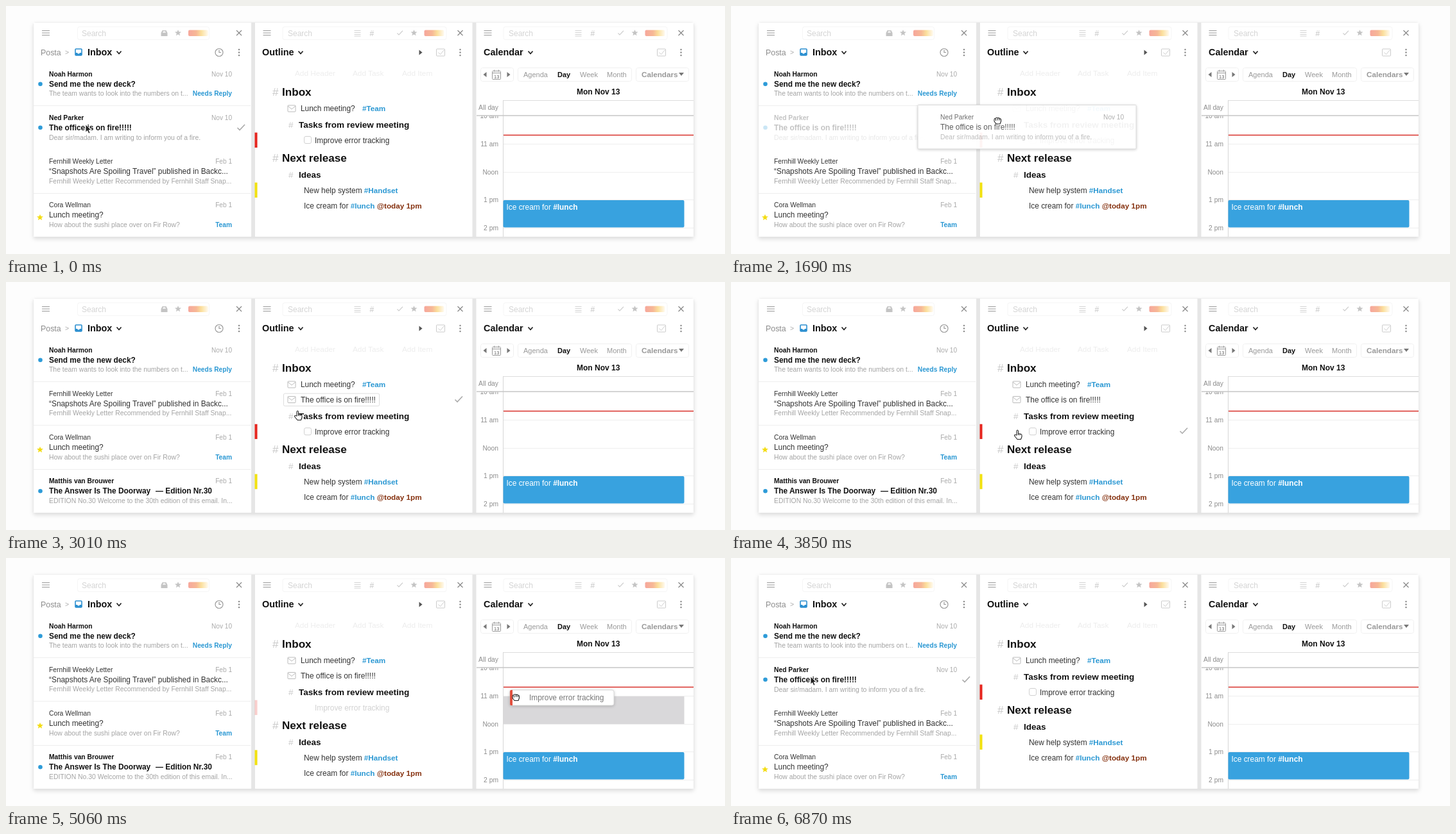
An HTML page that plays this animation: 1120 by 387 pixels, repeating every 6.97 s.

```html
<!DOCTYPE html>
<html lang="en">
<head>
<meta charset="utf-8">
<title>Mail, outline and calendar</title>
<style>
html, body { margin: 0; width: 100%; height: 100%; overflow: hidden; background: #fdfdfd; }
svg { display: block; width: 100vw; height: 100vh; font: 11.9px "Liberation Sans", Arial, sans-serif; fill: #333; }
.line { fill: none; stroke: #bbb; stroke-width: 1; }
.b { font-weight: bold; fill: #111; }
.name { font-size: 10.3px; }
.date { font-size: 10.1px; fill: #aaa; text-anchor: end; }
.snip { font-size: 10.4px; fill: #a3a3a3; }
.tag { font-weight: bold; fill: #2b98d3; }
.small { font-size: 10.2px; text-anchor: end; }
.due { font-weight: bold; fill: #85310f; }
.item .tag, .item .due { font-size: 11.7px; }
.title { font: bold 14.4px "Liberation Sans", Arial, sans-serif; fill: #111; }
.h1 { font-size: 17.1px; }
.h2 { font-size: 13.5px; }
.hash { fill: #c8c8c8; font-weight: normal; }
.search { font-size: 12px; fill: #d4d4d4; }
.add { font-size: 11.8px; fill: #ededed; }
.view { font-size: 11px; fill: #999; }
.hour { font-size: 10.3px; fill: #8c8c8c; text-anchor: end; }
.edge { fill: none; stroke: #f0f0f0; }
.rule { stroke: #eee; }
.light { fill: #fff; }
.card { fill: #fff; stroke: #d8d8d8; filter: drop-shadow(0 1px 2px #0003); }

/* One loop: hover, drag to outline, rest, drag to calendar, rest */
.anim { animation: 6.97s step-end infinite; }
#cursor { animation: path 6.97s ease-in-out infinite; }
.start { animation-name: start; }
.drag1 { animation-name: drag1; }
.placed { animation-name: placed; }
.hand { animation-name: hand; }
.fresh { animation-name: fresh; }
.hover { animation-name: hover; }
.drag2 { animation-name: drag2; }
.slot { animation-name: slot; }
.done { animation-name: done; }
.leave { animation-name: leave; }
.rise { animation-name: rise; }
.fall { animation-name: fall; }
.fade { animation-name: fade; }
.box { animation-name: box; }
@keyframes path {
  0%, 7.2% { transform: translate(127px, 191px); }
  24.25% { transform: translate(415px, 179px); animation-timing-function: ease-out; }
  33%, 35.5% { transform: translate(450px, 187px); }
  41.5%, 43.4% { transform: translate(455px, 208px); }
  48.5%, 58.3% { transform: translate(447px, 238px); }
  70.5%, 93.39% { transform: translate(794px, 217.500px); }
  93.4%, 100% { transform: translate(127px, 191px); }
}
@keyframes start { 0% { visibility: visible; } 12.05% { visibility: hidden; } 93.4%, 100% { visibility: visible; } }
@keyframes drag1 { 0% { visibility: hidden; } 12.05% { visibility: visible; } 34.43%, 100% { visibility: hidden; } }
@keyframes placed { 0% { visibility: hidden; } 34.43% { visibility: visible; } 93.4%, 100% { visibility: hidden; } }
@keyframes hand { 0% { visibility: hidden; } 34.43% { visibility: visible; } 58.54%, 100% { visibility: hidden; } }
@keyframes fresh { 0% { visibility: hidden; } 34.43% { visibility: visible; } 46.6%, 100% { visibility: hidden; } }
@keyframes hover { 0% { visibility: hidden; } 46.6% { visibility: visible; } 58.54%, 100% { visibility: hidden; } }
@keyframes drag2 { 0% { visibility: hidden; } 58.54% { visibility: visible; } 76.04%, 100% { visibility: hidden; } }
@keyframes box { 0% { visibility: visible; } 58.54% { visibility: hidden; } 76.04%, 100% { visibility: visible; } }
@keyframes slot { 0% { visibility: hidden; } 67.3% { visibility: visible; } 76.04%, 100% { visibility: hidden; } }
@keyframes done { 0% { visibility: hidden; } 76.04% { visibility: visible; } 93.4%, 100% { visibility: hidden; } }
@keyframes leave { 0% { opacity: 1; } 12.05% { opacity: .25; } 34.43% { opacity: 0; } 93.4%, 100% { opacity: 1; } }
@keyframes fade { 0% { opacity: 1; } 58.54% { opacity: .22; } 76.04%, 100% { opacity: 1; } }
@keyframes rise { 0% { transform: none; } 34.43% { transform: translateY(-68.2px); } 93.4%, 100% { transform: none; } }
@keyframes fall { 0% { transform: none; } 34.43% { transform: translateY(24.2px); } 93.4%, 100% { transform: none; } }
</style>
</head>
<body>
<svg viewBox="0 0 1120 387">
<defs>
  <linearGradient id="warm">
    <stop offset="0" stop-color="#f6a79c"/><stop offset=".4" stop-color="#f7b896"/>
    <stop offset=".65" stop-color="#fbdf9c"/><stop offset="1" stop-color="#fffaf0"/>
  </linearGradient>
  <path id="tick" class="line" d="M-5.500 .5L-2 4L6-4.500" style="stroke:#aaa;stroke-width:1.600"/>
  <path id="star" d="M0-5L1.400-1.700L5-1.500L2.200.8L3.100 4.300L0 2.300L-3.100 4.300L-2.200.8L-5-1.500L-1.400-1.700Z"/>
  <path id="chevron" class="line" d="M-3.500-2L0 2L3.500-2" style="stroke:#222;stroke-width:1.700"/>
  <g id="mail" class="line"><rect x="-6" y="-5" width="12" height="10" rx="1"/><path d="M-6-4L0 1L6-4"/></g>
  <g id="kebab" fill="#888"><circle cy="-4.500" r="1.200"/><circle r="1.200"/><circle cy="4.500" r="1.200"/></g>
  <g id="bar">
    <path class="line" d="M13 38.500h12M13 42h12M13 45.500h12" style="stroke:#999;stroke-width:1.200"/>
    <path class="line" d="M316 38l8 8m0-8l-8 8" style="stroke:#888;stroke-width:1.200"/>
    <use href="#kebab" x="320" y="72.500"/>
  </g>
  <g id="tools">
    <rect class="edge" x="43.500" y="32.500" width="255" height="20" rx="3" style="stroke:#f5f5f5"/>
    <path class="line" d="M155 38.500h10M155 41.500h10M155 44.500h10M155 47h10" style="stroke:#d4d4d4"/>
    <text class="search" x="179" y="46.500" style="fill:#c4c4c4">#</text>
    <use href="#tick" transform="translate(226 42) scale(.75)" opacity=".6"/>
    <use href="#star" x="248" y="42" fill="#c4c4c4"/>
    <rect x="264" y="37.500" width="31" height="9.500" rx="2" fill="url(#warm)"/>
  </g>
  <g id="board" class="line" style="stroke:#ccc"><rect x="-6.500" y="-5.500" width="13" height="11" rx="1"/><path d="M-3.500 0l3 3 6-7"/></g>
  <clipPath id="listClip"><rect x="42" y="90" width="340" height="270"/></clipPath>
  <clipPath id="dayClip"><rect x="732" y="171" width="339" height="189"/></clipPath>
</defs>

<rect x="42.500" y="25.500" width="1029" height="335" rx="3" fill="#e6e6e6" style="filter:drop-shadow(0 3px 3px #0002)"/>
<path class="light" d="M43 26h339v334H43zM388 26h338.500v334H388zM732.500 26H1071v334H732.500z"/>

<!-- Inbox -->
<use href="#bar" x="43"/>
<rect class="edge" x="111.500" y="32.500" width="205" height="20" rx="3" style="stroke:#f5f5f5"/>
<text class="search" x="118" y="46.500">Search</text>
<path d="M241.500 42l2-4h6l2 4v5h-10z" fill="#c4c4c4"/><path d="M244 41.500l1-2h3l1 2z" fill="#fff"/>
<use href="#star" x="268" y="42" fill="#c4c4c4"/>
<rect x="284" y="37.500" width="31" height="9.500" rx="2" fill="url(#warm)"/>
<text x="54" y="76.500" font-size="12.400" fill="#8c8c8c">Posta</text>
<text x="92" y="76" font-size="10.500" fill="#aaa">&gt;</text>
<rect x="108" y="67" width="10" height="10" rx="1" fill="none" stroke="#2b8fd0" stroke-width="1.600"/>
<path d="M108 73h3l1 1.500h2l1-1.500h3v4h-10z" fill="#2b8fd0"/>
<text class="title" x="127" y="77">Inbox</text>
<use href="#chevron" x="176" y="72.500"/>
<g class="line" style="stroke:#999;stroke-width:1.200"><circle cx="332" cy="72.500" r="6"/><path d="M332 68.500v4h3"/></g>

<g clip-path="url(#listClip)">
  <path class="rule" d="M43 155.500h338M43 292.500h338"/>
  <path class="rule anim placed" d="M43 223.500h338"/>
  <circle cx="53.500" cy="121.700" r="3.300" fill="#2d9bd8"/>
  <text class="b name" x="67" y="109.500">Noah Harmon</text><text class="date" x="352" y="109.500">Nov 10</text>
  <text class="b" x="67" y="126">Send me the new deck?</text>
  <text class="snip" x="67" y="140.300">The team wants to look into the numbers on t...</text>
  <text class="tag small" x="352" y="140.300">Needs Reply</text>
  <g class="anim leave">
    <circle cx="53.500" cy="189.800" r="3.300" fill="#2d9bd8"/>
    <text class="b name" x="67" y="177.700">Ned Parker</text><text class="date" x="352" y="177.700">Nov 10</text>
    <text class="b" x="67" y="194">The office is on fire!!!!!</text>
    <text class="snip" x="67" y="208.500">Dear sir/madam. I am writing to inform you of a fire.</text>
  </g>
  <use class="anim start" href="#tick" x="366" y="189.500"/>
  <g class="anim rise">
    <text class="name" x="67" y="246">Fernhill Weekly Letter</text><text class="date" x="352" y="246">Feb 1</text>
    <text x="67" y="262.200">“Snapshots Are Spoiling Travel” published in Backc...</text>
    <text class="snip" x="67" y="276.700">Fernhill Weekly Letter Recommended by Fernhill Staff Snap...</text>
    <use href="#star" x="53" y="330" fill="#f3dc12"/>
    <text class="name" x="67" y="314.200">Cora Wellman</text><text class="date" x="352" y="314.200">Feb 1</text>
    <text x="67" y="330.400">Lunch meeting?</text>
    <text class="snip" x="67" y="344.900">How about the sushi place over on Fir Row?</text>
    <text class="tag small" x="352" y="344.900">Team</text>
    <circle cx="53.500" cy="394.500" r="3.300" fill="#2d9bd8"/>
    <text class="b name" x="67" y="382.300">Matthis van Brouwer</text><text class="date" x="352" y="382.300">Feb 1</text>
    <text class="b" x="67" y="398.600">The Answer Is The Doorway <tspan x="233">— Edition Nr.30</tspan></text>
    <text class="snip" x="67" y="413.100">EDITION No.30 Welcome to the 30th edition of this email. In...</text>
  </g>
</g>

<!-- Outline -->
<use href="#bar" x="387.500"/>
<use href="#tools" x="387.500"/>
<text class="search" x="439" y="46.500">Search</text>
<text class="title" x="399" y="77">Outline</text>
<use href="#chevron" x="459" y="72.500"/>
<path d="M643.500 68.500l5 4-5 4z" fill="#555"/>
<use href="#board" x="677" y="72.500"/>
<g class="add"><text x="450" y="108.500">Add Header</text><text x="540" y="108.500">Add Task</text><text x="617" y="108.500">Add Item</text></g>
<text class="b h1" x="430" y="140"><tspan class="hash" x="415">#</tspan><tspan x="430">Inbox</tspan></text>
<use href="#mail" x="445" y="160"/>
<text class="item" x="459" y="164.200">Lunch meeting?<tspan class="tag" x="555">#Team</tspan></text>
<g class="anim placed">
  <rect class="anim fresh" x="432.500" y="174" width="149" height="19.500" rx="2" fill="#fff" stroke="#ddd"/>
  <use href="#mail" x="445" y="183.500"/>
  <text x="459" y="188">The office is on fire!!!!!</text>
  <use class="anim fresh" href="#tick" x="705" y="183"/>
</g>
<g class="anim fall">
  <text class="b h2" y="189.500"><tspan class="hash" x="440">#</tspan><tspan x="456">Tasks from review meeting</tspan></text>
  <g class="anim fade">
    <rect x="387.500" y="197.500" width="4" height="23.500" fill="#e6261f"/>
    <rect class="anim box" x="464.500" y="203.500" width="11" height="11" rx="2.500" fill="none" stroke="#d0d0d0"/>
    <text x="481" y="213.500">Improve error tracking</text>
  </g>
  <text class="due anim done" x="602" y="213.500">@11/13 11am</text>
  <use class="anim hover" href="#tick" x="705" y="208"/>
  <text class="b h1" y="242.500"><tspan class="hash" x="415">#</tspan><tspan x="430">Next release</tspan></text>
  <text class="b h2" y="268"><tspan class="hash" x="440">#</tspan><tspan x="456">Ideas</tspan></text>
  <rect x="387.500" y="275.500" width="4" height="23.500" fill="#f2e210"/>
  <text class="item" x="464" y="292">New help system <tspan class="tag">#Handset</tspan></text>
  <text class="item" x="464" y="316">Ice cream for <tspan class="tag">#lunch</tspan> <tspan class="due">@today 1pm</tspan></text>
</g>

<!-- Calendar -->
<use href="#bar" x="731.500"/>
<use href="#tools" x="731.500"/>
<text class="search" x="783" y="46.500">Search</text>
<text class="title" x="744" y="77">Calendar</text>
<use href="#chevron" x="817" y="72.500"/>
<use href="#board" x="1021" y="72.500"/>
<g class="edge"><rect x="739.500" y="96.500" width="51" height="21" rx="3"/><rect x="797.500" y="96.500" width="177" height="21" rx="3"/><rect x="981.500" y="96.500" width="82" height="21" rx="3"/></g>
<path d="M748.500 103v8l-5-4zM780.500 103v8l5-4zM1048 104h8l-4 5z" fill="#777"/>
<g class="line" style="stroke:#999"><rect x="757.500" y="101.500" width="13" height="13" rx="1"/><path d="M757.500 104.500h13M760.500 99.500v3M767.500 99.500v3"/></g>
<text x="760" y="113" font-size="7.500" fill="#666">13</text>
<g class="view"><text x="806" y="110.500">Agenda</text><text class="b" x="859" y="110.500">Day</text><text x="894" y="110.500">Week</text><text x="936" y="110.500">Month</text></g>
<text x="990" y="110.500" font-size="11.700" font-weight="bold" fill="#999">Calendars</text>
<text class="b" x="889" y="138" font-size="12">Mon Nov 13</text>
<text class="hour" x="767" y="161.500">All day</text>
<g clip-path="url(#dayClip)">
  <path class="rule" d="M774 215.500h297M774 259.500h297M774 302.500h297M774 346.500h297"/>
  <g class="hour"><text x="767" y="175">10 am</text><text x="767" y="219">11 am</text><text x="767" y="262.500">Noon</text><text x="767" y="306">1 pm</text><text x="767" y="349.500">2 pm</text></g>
</g>
<path class="rule" d="M774 147.500h297" style="stroke:#ddd"/>
<path d="M774.500 147v213" stroke="#d6d6d6"/>
<path d="M733 171h338" stroke="#c6c6c6" stroke-width="1.600"/>
<path d="M775 201.500h296" stroke="#d8302a" stroke-width="1.600"/>
<rect x="774.500" y="303" width="282" height="42.500" rx="2" fill="#38a2df"/>
<text class="light" x="779.500" y="317.500">Ice cream for <tspan font-weight="bold">#lunch</tspan></text>
<rect class="anim slot" x="774.500" y="216" width="282" height="43" fill="#d9d8da"/>
<g class="anim done">
  <rect x="774.500" y="216" width="282" height="42.500" rx="2" fill="#38a2df"/>
  <rect x="774.500" y="216" width="3" height="42.500" fill="#d92a24"/>
  <text class="light" x="779.500" y="231">Improve error tracking</text>
</g>

<!-- Pointer with whatever it carries -->
<g id="cursor">
  <g class="anim drag1">
    <g opacity=".95">
      <rect class="card" x="-124" y="-24.500" width="340" height="68.500" rx="1"/>
      <text class="name" x="-89" y="-2" fill="#666">Ned Parker</text><text class="date" x="197" y="-2">Nov 10</text>
      <text x="-89" y="14" fill="#555">The office is on fire!!!!!</text>
      <text class="snip" x="-89" y="28.500" style="fill:#bbb">Dear sir/madam. I am writing to inform you of a fire.</text>
    </g>
  </g>
  <g class="anim drag2">
    <rect class="card" x="-9" y="-11.500" width="162" height="24" rx="3"/>
    <path d="M-9-9.500q0-2 2-2h2v24h-2q-2 0-2-2z" fill="#e2513f"/>
    <text x="21" y="4.500" fill="#777">Improve error tracking</text>
  </g>
  <g stroke-linejoin="round" stroke="#222" stroke-width="1.100" fill="#fff">
    <path class="anim start" d="M-3-6v12l2.800-2.500 2 4.500 2.200-1-2-4.300h3.800z" style="fill:#222;stroke:#fff;stroke-width:.8"/>
    <g class="anim drag1"><g id="grip">
      <path d="M-5 1v-3q.5-2 2.500-2q1.300-1.500 3 0q1.500-1 3 .5q2 0 2 2v2.500l-1.500 4h-6z"/>
      <path d="M-2.500-3v3M.5-3.500v3M3.300-3v2.500"/>
    </g></g>
    <use class="anim drag2" href="#grip" style="visibility:inherit" opacity="0"/>
    <g class="anim drag2">
      <path d="M-5 1v-3q.5-2 2.500-2q1.300-1.500 3 0q1.500-1 3 .5q2 0 2 2v2.500l-1.500 4h-6z"/>
      <path d="M-2.500-3v3M.5-3.500v3M3.300-3v2.500"/>
    </g>
    <g class="anim hand"><path d="M-2 1v-6q0-2 1.200-2t1.300 2v3.500l4 .8q1.500.5 1.500 2v2.200l-1.500 4h-5.500l-4.500-5.500q0-2 1.500-1.500z"/><path d="M.5-1.500v2.500M3-.8v2"/></g>
    <path class="anim done" d="M-6 0h12M0-5v10M-2.500-3.500l2.500-2.500 2.500 2.500zM-2.500 3.500l2.500 2.500 2.500-2.500z" style="fill:#111;stroke:#111;stroke-width:1.600"/>
  </g>
</g>
</svg>
</body>
</html>
```
